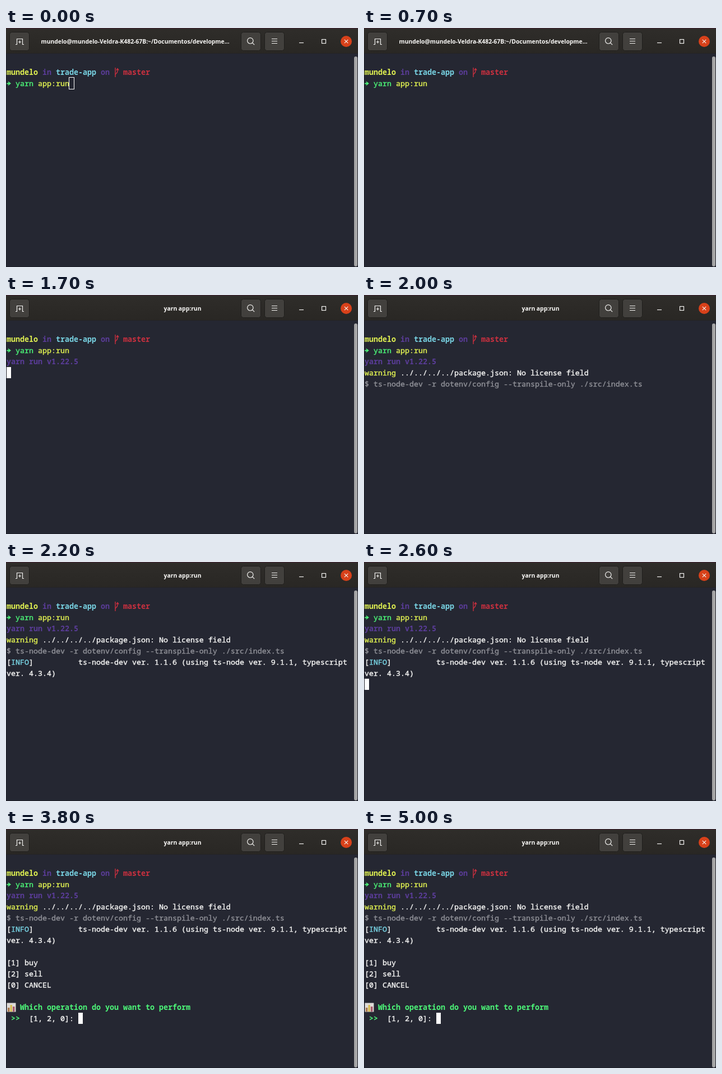
An HTML page that plays this animation: 628 px wide and 428 px high, repeating every 5.6 s.

```html
<!DOCTYPE html>
<html lang="en">
<head>
<meta charset="utf-8">
<title>Terminal</title>
<style>
  html, body { margin: 0; width: 100%; height: 100%; overflow: hidden; background: #252732; }
  svg { display: block; }
  text { white-space: pre; }

  .term {
    font: 13.3333px "Noto Sans Mono", "DejaVu Sans Mono", monospace;
    font-variant-ligatures: none;
    color: #f4f4f3;
  }
  /* A hairline stroke gives the regular face a medium weight */
  .term text, .term tspan { fill: currentColor; stroke: currentColor; stroke-width: .4px; }
  .term .b, .term .b tspan { font-weight: 700; stroke: none; }
  .title { font: 700 10.35px "Open Sans", "Noto Sans", sans-serif; fill: #fbfaf8; text-anchor: middle; }
  .yellow { color: #e0f151; }
  .purple { color: #5a3c98; }
  .cyan { color: #78d3e3; }
  .red { color: #c9303f; }
  .green { color: #4cf678; }
  .grey { color: #8f9097; }

  .button { fill: #42403d; stroke: #1f1e1c; }
  .icon { fill: none; stroke: #f2f1ef; stroke-width: 1.2; }

  /* One 5.6 s loop, hard cuts only */
  .anim { animation: 5.6s step-end infinite; }
  #idle { animation-name: idle; }
  #busy { animation-name: busy; }
  #run { animation-name: run; }
  #script { animation-name: script; }
  #info { animation-name: info; }
  #menu { animation-name: menu; }
  #hollow { animation-name: hollow; }
  #cursor { animation-name: cursor; }

  @keyframes idle { 0% { opacity: 1 } 25%, 100% { opacity: 0 } }
  @keyframes busy { 0% { opacity: 0 } 25%, 100% { opacity: 1 } }
  @keyframes run { 0% { opacity: 0 } 30.357%, 100% { opacity: 1 } }
  @keyframes script { 0% { opacity: 0 } 32.142%, 100% { opacity: 1 } }
  @keyframes info { 0% { opacity: 0 } 39.285%, 100% { opacity: 1 } }
  @keyframes menu { 0% { opacity: 0 } 51.785%, 100% { opacity: 1 } }
  @keyframes hollow { 0% { opacity: 1 } 1.785%, 100% { opacity: 0 } }
  @keyframes cursor {
    0% { opacity: 0; transform: translate(113px, 89px) }
    1.785% { opacity: 1; transform: translate(113px, 89px) }
    12.5% { opacity: 0; transform: translate(113px, 89px) }
    23.214% { opacity: 1; transform: translate(113px, 89px) }
    30.357% { opacity: 1; transform: translate(1px, 129px) }
    32.142% { opacity: 1; transform: translate(1px, 169px) }
    35.714% { opacity: 0; transform: translate(1px, 209px) }
    46.428% { opacity: 1; transform: translate(1px, 209px) }
    51.785% { opacity: 1; transform: translate(129px, 329px) }
    57.142% { opacity: 0; transform: translate(129px, 329px) }
    67.857% { opacity: 1; transform: translate(129px, 329px) }
    78.571% { opacity: 0; transform: translate(129px, 329px) }
    89.285%, 100% { opacity: 1; transform: translate(129px, 329px) }
  }
</style>
</head>
<body>
<svg width="628" height="428" viewBox="0 0 628 428">
  <defs>
    <linearGradient id="bar" x2="0" y2="1">
      <stop offset="0" stop-color="#2f2d2a"/>
      <stop offset="1" stop-color="#292724"/>
    </linearGradient>
  </defs>

  <!-- Window -->
  <rect width="628" height="428" fill="#252732"/>
  <rect width="628" height="46" fill="url(#bar)"/>
  <rect width="628" height="1" fill="#3a1c2b"/>
  <path d="M0 45.5H628" stroke="#242326"/>
  <path d="M.5 46V428M0 427.5H628" stroke="#1e1f29" fill="none"/>
  <path d="M621 428V54a3 3 0 0 1 6 0V424a3 3 0 0 1-6 0Z" fill="#a5a5a6"/>

  <!-- Header controls -->
  <g class="button">
    <rect x="6.5" y="7.5" width="35" height="33" rx="4"/>
    <rect x="419.5" y="7.5" width="35" height="33" rx="4"/>
    <rect x="461.5" y="7.5" width="35" height="33" rx="4"/>
  </g>
  <g class="icon">
    <path d="M17 29.5H19.5V19.5H29.5V29.5H32M24.5 22.5V27.5M22 25H27"/>
    <circle cx="435.8" cy="22.8" r="5.2"/>
    <path d="M439.6 26.6L443.2 30.2"/>
    <path d="M474 19.5H484M474 23.5H484M474 27.5H484"/>
    <path d="M523 26.5H531"/>
    <rect x="563.5" y="20.5" width="7" height="7"/>
  </g>
  <circle cx="607" cy="24" r="10" fill="#d8411a"/>
  <path class="icon" d="M603.8 20.8L610.2 27.2M610.2 20.8L603.8 27.2"/>

  <text id="idle" class="title anim" x="230.5" y="28">mundelo@mundelo-Veldra-K482-67B:~/Documentos/developme…</text>
  <text id="busy" class="title anim" x="315" y="28">yarn app:run</text>

  <g class="term">
    <!-- Prompt -->
    <text class="b" x="1" y="84"><tspan class="yellow">mundelo</tspan> <tspan class="purple">in</tspan> <tspan class="cyan">trade-app</tspan> <tspan class="purple">on</tspan></text>
    <path class="red" d="M195 71V88M195 84.5C195 81 199 81.5 199 77V73M196.8 75.6L199 72.6L201.2 75.6" fill="none" stroke="currentColor" stroke-width="1.4"/>
    <text class="b red" x="209" y="84">master</text>
    <path class="green" d="M1.3 98.4H4.6L3.6 95.2L9 99.3L3.6 103.4L4.6 100.4H1.3Z" fill="currentColor"/>
    <text x="17" y="104"><tspan class="green">yarn</tspan> <tspan class="yellow">app:run</tspan></text>

    <!-- Output -->
    <text id="run" class="anim b purple" x="1" y="124">yarn run v1.22.5</text>
    <g id="script" class="anim">
      <text x="1" y="144"><tspan class="yellow">warning</tspan> ../../../../package.json: No license field</text>
      <text class="grey" x="1" y="164">$ ts-node-dev -r dotenv/config --transpile-only ./src/index.ts</text>
    </g>
    <g id="info" class="anim">
      <text x="1" y="184">[<tspan class="cyan">INFO</tspan>]</text>
      <text x="129" y="184">ts-node-dev ver. 1.1.6 (using ts-node ver. 9.1.1, typescript</text>
      <text x="1" y="204">ver. 4.3.4)</text>
    </g>
    <g id="menu" class="anim">
      <text x="1" y="244">[1] buy</text>
      <text x="1" y="264">[2] sell</text>
      <text x="1" y="284">[0] CANCEL</text>
      <rect x="1.5" y="311.5" width="16" height="16" fill="#dedbd8"/>
      <path d="M3 327V320H6.5V327Z" fill="#a9794f"/>
      <path d="M7.5 327V315H11V327Z" fill="#d8bd55"/>
      <path d="M12 327V318H15.5V327Z" fill="#a8596b"/>
      <text class="b green" x="25" y="324">Which operation do you want to perform</text>
      <text class="b green" x="9" y="344">&gt;&gt;</text>
      <text x="41" y="344">[1, 2, 0]:</text>
    </g>
  </g>

  <!-- Cursor -->
  <rect id="hollow" class="anim" x="112.5" y="88.5" width="9" height="21" fill="none" stroke="#fff"/>
  <rect id="cursor" class="anim" width="8" height="20" fill="#fff"/>
</svg>
</body>
</html>
```
